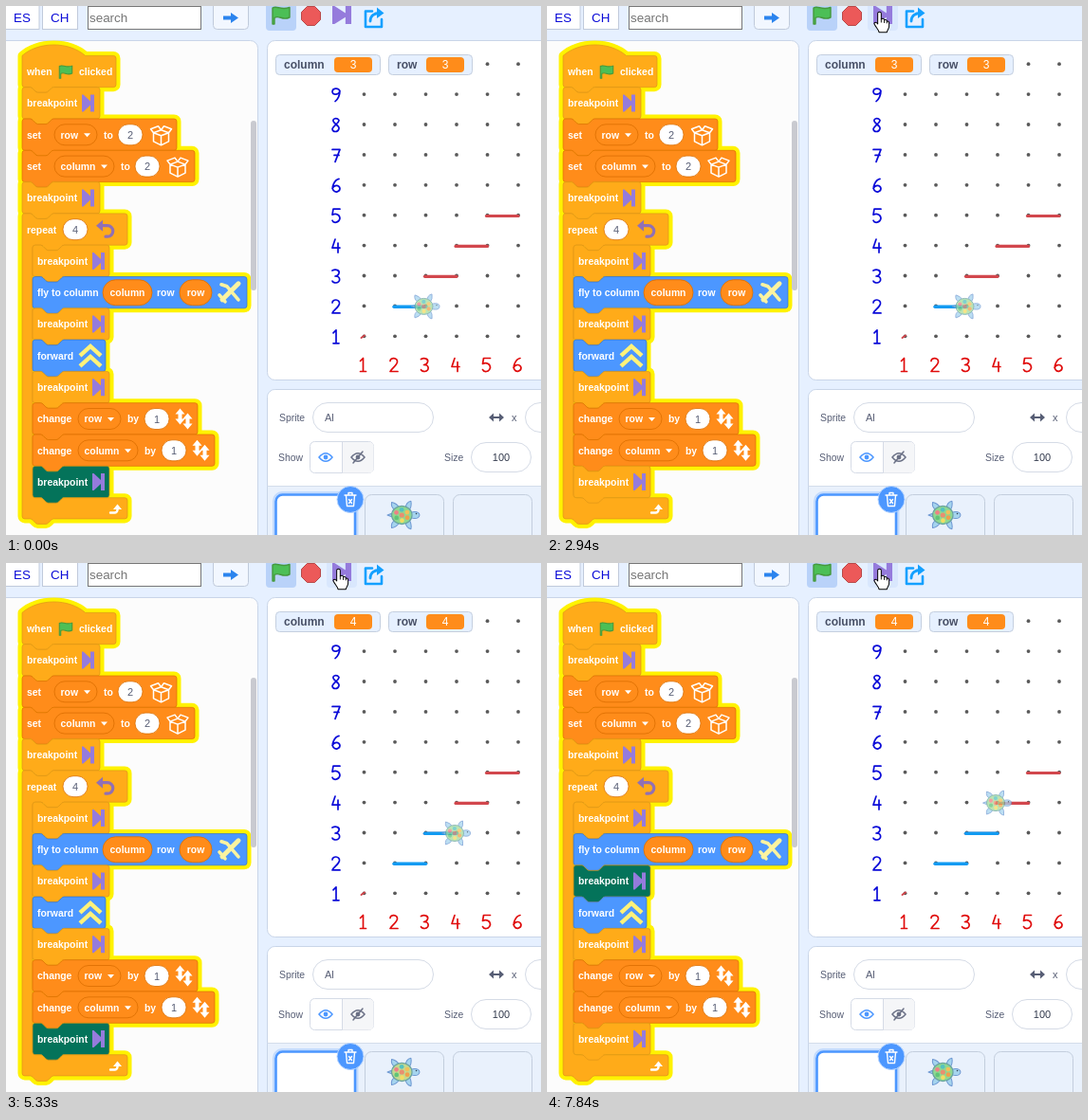
Animation, 564 px wide and 558 px high, one loop 8000 ms. Source, as an HTML page:

```html
<!DOCTYPE html>
<html lang="en">
<head>
<meta charset="utf-8">
<title>Stepping through a loop</title>
<style>
html, body { margin: 0; width: 100%; height: 100%; overflow: hidden; background: #e6f0ff; }
svg { display: block; width: 564px; height: 558px; font-family: "Liberation Sans", Arial, sans-serif; }
.b { font-weight: bold; font-size: 10.4px; fill: #fff; }
.m { text-anchor: middle; }
.num { font-size: 11px; fill: #575e75; text-anchor: middle; }
.ui { font-size: 11px; fill: #575e75; }
.small { font-size: 10.4px; fill: #575e75; }
.bar { font-size: 13.4px; }
.mon { font-size: 12px; font-weight: bold; fill: #485066; }
</style>
</head>
<body>
<svg id="view" viewBox="0 0 564 558"></svg>
<script>
const LOOP = 8000, S = 0.694, ROW = 33.3, TOP = 52.4;
const $ = id => document.getElementById(id);

const COLORS = {
  control: ['#ffab19', '#dd9418'],
  data: ['#ff8c1a', '#db6e00'],
  motion: ['#4c97ff', '#3373cc']
};
const ACTIVE_FILL = '#04735a';
const PURPLE = '#957bdc';

// ---- basic pieces ----
const rect = (x, y, w, h, fill, stroke = 'none', r = 0, sw = 1) =>
  `<rect x="${x}" y="${y}" width="${w}" height="${h}" rx="${r}" fill="${fill}" stroke="${stroke}" stroke-width="${sw}"/>`;
const text = (x, y, str, cls, extra = '') => `<text x="${x}" y="${y}" class="${cls}" ${extra}>${str}</text>`;
const line = (d, color, w, extra = '') =>
  `<path d="${d}" fill="none" stroke="${color}" stroke-width="${w}" stroke-linecap="round" stroke-linejoin="round" ${extra}/>`;
const fill = (d, color, extra = '') => `<path d="${d}" fill="${color}" ${extra}/>`;
const place = (x, y, inner, k = 1) => `<g transform="translate(${x} ${y}) scale(${k})">${inner}</g>`;

const skip = fill('M0 0H1.5L9 7V0h4v18h-4v-7L1.5 18H0z', PURPLE);
const flag = k => fill('M1 2C6-1 9 5 19 1.5V12C11 16 8 9 3 12.5V19H1z', '#4cbf56',
  `stroke="#45993d" stroke-width="1.4" stroke-linejoin="round" transform="scale(${k})"`);
const box = line('M-8-2L0 1L8-2V7L0 11L-8 7ZM0 1V11M-8-2L-11-6L-3-9L0-5L3-9L11-6L8-2M-8-2L0-5L8-2', '#fff', 1.5);
const twoWay = 'l5 6h-3v5h3l-5 6l-5-6h3v-5h-3z';
const upDown = fill(`M-4-11${twoWay}M4-6${twoWay}`, '#fff');

// ---- block outlines, in block units ----
const notch = 'c2 0 3 1 4 2l4 4c1 1 2 2 4 2h12c2 0 3-1 4-2l4-4c1-1 2-2 4-2';
const bump = 'c-2 0-3 1-4 2l-4 4c-1 1-2 2-4 2h-12c-2 0-3-1-4-2l-4-4c-1-1-2-2-4-2';
const topEdge = `M0 4A4 4 0 0 1 4 0H12${notch}`;
const right = (w, y0, y1) => `H${w - 4}a4 4 0 0 1 4 4V${y1 - 4}a4 4 0 0 1-4 4`;
const foot = h => `H48${bump}H4A4 4 0 0 1 0 ${h - 4}Z`;
const plain = w => topEdge + right(w, 0, 48) + foot(48);
const hat = w => `M0 0C25-22 71-22 96 0${right(w, 0, 48)}${foot(48)}`;
const cShape = (w, n) => {
  const low = 48 + 48 * n;
  return topEdge + right(w, 0, 48) + `H64${bump}h-8a4 4 0 0 0-4 4V${low - 4}a4 4 0 0 0 4 4`
    + right(w, low, low + 32) + foot(low + 32);
};

// row, left, right edge, colour, outline
const BLOCKS = [
  [0, 17, 116, 'control', hat],
  [1, 17, 99, 'control'], [2, 17, 180, 'data'], [3, 17, 199, 'data'], [4, 17, 99, 'control'],
  [5, 17, 128, 'control', w => cShape(w, 8)],
  [6, 28, 109, 'control'], [7, 28, 254, 'motion'], [8, 28, 109, 'control'], [9, 28, 105, 'motion'],
  [10, 28, 109, 'control'], [11, 28, 202, 'data'], [12, 28, 220, 'data'], [13, 28, 109, 'control']
];
const mid = r => 69.2 + ROW * r;

function blockPaths(glow) {
  return BLOCKS.map(([r, x, x2, kind, shape = plain]) => {
    const [f, s] = COLORS[kind];
    const paint = glow ? 'fill="none" stroke="#fff200" stroke-width="13" stroke-linejoin="round"'
      : `id="block${r}" fill="${f}" stroke="${s}" stroke-width="1"`;
    return `<path transform="translate(${x} ${TOP + ROW * r}) scale(${S})" d="${shape((x2 - x) / S)}" ${paint}/>`;
  }).join('');
}

const label = (r, x, str) => text(x, mid(r) + 3.8, str, 'b');
const pill = (r, x, w, f, s, h = 22) => rect(x, mid(r) - h / 2, w, h, f, s, h / 2, .8);
const value = (r, cx, n) => pill(r, cx - 13, 26, '#fff', '#db6e00') + text(cx, mid(r) + 4, n, 'num');
const menu = (r, x, w, name) => pill(r, x, w, ...COLORS.data) + label(r, x + 6.5, name)
  + fill(`M${x + w - 14} ${mid(r) - 1.5}h7l-3.5 4z`, '#fff');
const reporter = (r, x, w, name) => pill(r, x, w, ...COLORS.data, 27)
  + text(x + w / 2, mid(r) + 3.8, name, 'b m');

function blockContents() {
  let s = label(0, 22, 'when') + place(55.5, 62, flag(.75)) + label(0, 77, 'clicked');
  for (const r of [1, 4, 6, 8, 10, 13]) {
    const x = r < 5 ? 22 : 33;
    s += label(r, x, 'breakpoint') + place(x + 58, mid(r) - 9, skip);
  }
  s += label(2, 22, 'set') + menu(2, 51, 45, 'row') + label(2, 103, 'to') + value(2, 131, 2) + place(163.5, mid(2), box);
  s += label(3, 22, 'set') + menu(3, 51, 63, 'column') + label(3, 121, 'to') + value(3, 149, 2) + place(181, mid(3), box);
  s += label(5, 22, 'repeat') + value(5, 73, 4)
    + place(105, mid(5), line('M-4-4H2A5.5 5.5 0 0 1 2 7.5H0', '#9170b4', 3.2) + fill('M-10-4L-3-10V2z', '#9170b4'));
  s += label(7, 33, 'fly to column') + reporter(7, 102, 52, 'column') + label(7, 159, 'row') + reporter(7, 183, 34, 'row')
    + place(236, mid(7) - .5, line('M-8 8L9-9', '#fbf3a0', 5) + line('M-9-8L-3-6L9 8M-11 3L-5 10', '#fbf3a0', 3.6));
  s += label(9, 33, 'forward') + place(89, mid(9), line('M-11 0L0-10L11 0M-11 11L0 1L11 11', '#fff27a', 4.4, 'style="stroke-linecap:butt;stroke-linejoin:miter"'));
  s += label(11, 33, 'change') + menu(11, 76, 45, 'row') + label(11, 128, 'by') + value(11, 159, 1) + place(187.5, mid(11), upDown);
  s += label(12, 33, 'change') + menu(12, 76, 63, 'column') + label(12, 146, 'by') + value(12, 177, 1) + place(205.5, mid(12), upDown);
  return s + line('M110 534.5h4.5a3 3 0 0 0 3-3v-1', '#fff', 2.4) + fill('M113 531L117.5 525.5L122 531z', '#fff');
}

// ---- toolbar ----
function toolbar() {
  return rect(-6, -6, 41, 30.5, '#fff', '#c0cadb') + text(8, 17, 'ES', 'bar', 'fill="#0b0bd8"')
    + rect(38.5, -6, 37, 30.5, '#fff', '#c0cadb') + text(47, 17, 'CH', 'bar', 'fill="#0b0bd8"')
    + rect(86.5, .5, 119, 24, '#fff', '#767676') + text(88, 17, 'search', 'bar', 'fill="#757575"')
    + rect(218.5, -4, 37, 28.5, '#f2f7ff', '#c0cadb', 4)
    + fill('M229 10.5h8V7l8 5.5l-8 5.5v-3.5h-8z', '#2b84ee')
    + rect(274, -6, 32, 32, '#b9d2f9', 'none', 4)
    + place(280, 0, flag(1))
    + fill('M317.5 .5h8l6 6v8l-6 6h-8l-6-6v-8z', '#ec5959', 'stroke="#b84848"')
    + `<g id="hover">${rect(338, -6, 32, 32, '#d9e7fd', 'none', 4)}</g>`
    + `<g transform="translate(344 0) scale(1.54 1.06)">${skip}</g>`
    + line('M386 5.5H379V22H396V14', '#14a0ff', 2.6)
    + line('M384 16C384 10 388 7.5 394 7.5', '#14a0ff', 2.8) + fill('M391 1.5L398.5 7.5L391 13z', '#14a0ff');
}

// ---- stage ----
const DIGITS = [
  'M-3-4L0-7V7M-3 7H3',
  'M-4-4C-4-8 4-8 3.5-3C3 1-3 4-4 7H4',
  'M-4-6C0-8 4-6 3-3C2 0 0 0-1 0C5 0 5 6 0 7C-2 7-4 6-4 5',
  'M-1-7L-4 2H4M2-3V7',
  'M4-7H-3L-4-1C0-3 4-1 4 3C3 8-3 8-4 5',
  'M3-7C-2-6-5 2-3 5C-1 8 4 7 4 3C3-1-2-1-4 3',
  'M-4-6H4L-1 7M-2 0H3',
  'M3-5C1-8-4-7-3-4C-2-1 4 1 3 4C2 8-4 8-4 4C-3 1 3-2 3-5',
  'M4-4C2-8-4-7-4-3C-3 1 3 0 4-4C4 0 2 5-1 7'
];
const gx = c => 377.5 + (c - 1) * 32.5;
const gy = r => 348.3 - (r - 1) * 31.9;
const segment = (c, r, len = 1) => `M${gx(c) - 1} ${gy(r) + .8}H${gx(c + len) - 1 + len}`;

const turtle = (shellId = '') => {
  const limb = 'fill="#a5d4ee" stroke="#6d97d2" stroke-width=".9" stroke-linejoin="round"';
  const flippers = k => `M2 ${6 * k}Q2 ${12 * k} 7 ${13 * k}Q8 ${8 * k} 5 ${4 * k}ZM-8 ${5 * k}Q-12 ${7 * k}-11 ${12 * k}Q-6 ${11 * k}-4 ${7 * k}Z`;
  let s = `<path ${limb} d="${flippers(1)}${flippers(-1)}M-11-1.5L-15 0L-11 1.5Z"/>`
    + `<ellipse cx="10.5" cy="0" rx="4.5" ry="3.2" ${limb}/>`
    + `<ellipse ${shellId} cx="-1.5" cy="0" rx="9.5" ry="8.5" fill="#a5dc9b" stroke="#6aa3a0"/>`;
  const spots = ['#f0a04c', '#f4dc62', '#60c478', '#ee8086', '#55c2c0', '#f2c05a'];
  spots.forEach((c, i) => {
    const a = i * Math.PI / 3 + .5;
    s += `<circle cx="${-1.5 + 5.8 * Math.cos(a)}" cy="${5 * Math.sin(a)}" r="2.1" fill="${c}"/>`;
  });
  return s + '<circle cx="-1.5" cy="0" r="2.3" fill="#e98f70"/><circle cx="12" cy="-1.3" r=".7" fill="#345"/>';
};

function stage() {
  let s = rect(275.5, 36.5, 300, 358, '#fff', '#c9d5e8', 8);
  for (let r = 1; r <= 10; r++)
    for (let c = r > 9 ? 5 : 1; c <= 6; c++) s += `<circle cx="${gx(c)}" cy="${gy(r)}" r="1.9" fill="#5a5a5a"/>`;
  DIGITS.forEach((d, i) => {
    s += place(348, gy(i + 1) + .5, line(d, '#0a0ad8', 1.7));
    if (i < 6) s += place(gx(i + 1) - 1, 378.5, line(d, '#e00c0c', 1.7));
  });
  const red = '#d2474d', blue = '#129bf2';
  s += line('M374.5 350L378 347.5', red, 2);
  for (let c = 3; c <= 5; c++) s += line(segment(c, c), red, 3.2);
  s += line(segment(2, 2), blue, 3.4) + line('', blue, 3.4, 'id="trail"');
  const monitor = (x, w, name, id) => rect(x + .5, 51.5, w, 21, '#e6f0ff', '#c4cfdf', 4)
    + text(x + 9, 66, name, 'mon') + rect(x + w - 48, 54, 40, 16, '#ff8c1a', 'none', 4)
    + text(x + w - 28, 66.2, 3, 'm', `id="${id}" fill="#fff" font-size="12"`);
  return s + monitor(284, 110, 'column', 'colVal') + monitor(403, 88, 'row', 'rowVal')
    + `<g id="walker" opacity=".75">${turtle()}</g>`;
}

// ---- sprite panel ----
function sprites() {
  const grey = '#d5dbe6', card = ['#e9f1fc', '#c3cedd', 7];
  const eye = c => fill('M-7 0Q0-8.5 7 0Q0 8.5-7 0Z', 'none', `stroke="${c}" stroke-width="1.5"`) + `<circle r="2.4" fill="${c}"/>`;
  return rect(275.5, 404.5, 300, 170, '#e9f1fc', '#c9d5e8', 8)
    + fill('M276 506V413a8 8 0 0 1 8-8H564V506z', '#fff') + line('M276 506.5H564', '#d3ddeb', 1)
    + text(288, 438, 'Sprite', 'small') + rect(323.5, 418.5, 127, 31, '#fff', grey, 15.5) + text(336, 438, 'Al', 'ui')
    + line('M512 434H522', '#575e75', 2) + fill('M514 429.5L509 434L514 438.5zM520 429.5L525 434L520 438.5z', '#575e75')
    + text(533, 438, 'x', 'ui') + rect(547.5, 418.5, 60, 31, '#fff', grey, 15.5)
    + text(287, 480, 'Show', 'small')
    + rect(320.5, 459.5, 67, 33, '#fff', grey, 5) + fill('M354.5 460H383a4.5 4.5 0 0 1 4.5 4.5V488a4.5 4.5 0 0 1-4.5 4.5H354.5z', '#f5f6f8') + line('M354.5 460V492', grey, 1)
    + place(337, 476, eye('#4c97ff')) + place(371, 476, eye('#6b7186') + line('M-5 6L5-6', '#6b7186', 1.5))
    + text(462, 480, 'Size', 'small') + rect(490.5, 460.5, 63, 31, '#fff', grey, 15.5) + text(522, 480, '100', 'm', 'fill="#333a4d" font-size="11"')
    + rect(281, 512, 90.5, 74, '#c3dbfd', 'none', 10) + rect(284.5, 515.5, 83.5, 70, '#fff', '#4c97ff', 7, 2.6)
    + rect(378.5, 515.5, 83, 70, ...card) + rect(471.5, 515.5, 83, 70, ...card)
    + '<circle cx="363" cy="520.5" r="14" fill="#4c97ff" stroke="#b7d5ff"/>'
    + line('M357 516H369M361 516V513.5H365V516M358.5 516.5L359.5 527.5H366.5L367.5 516.5M361.5 520.5L364.5 524.5M364.5 520.5L361.5 524.5', '#fff', 1.4)
    + place(419, 537, turtle('id="thumbShell"'), 1.13);
}

// ---- pointer ----
const arrow = fill('M0 0V16L4 12.5L7 19L9.5 18L7 11.5H12Z', '#fff', 'stroke="#000"');
const hand = place(.5, 0, fill('M-2 1.5C-2-1 2-1 2 1.5V8C3 7 5.5 7.2 5.5 9C7 8 8.5 9 8.5 10.5C10 10 11 11 11 12.5V16C11 19 9 20 8.5 23H-.5C-1 20-3.5 18-5.5 14.5C-7 12-4.5 10.5-2 13.5Z',
  '#fff', 'stroke="#000" stroke-width="1.1" stroke-linejoin="round"') + line('M2 8V11.5M5.5 9.5V12M8.5 11V12.5', '#000', 1), .92);

$('view').innerHTML = rect(0, 0, 564, 558, '#e6f0ff')
  + rect(-10.5, 36.5, 276, 540, '#fcfcfc', '#c9d5e8', 8)
  + toolbar() + blockPaths(true) + blockPaths(false) + blockContents()
  + rect(258, 121, 6, 179, '#c9cad0', 'none', 3)
  + stage() + sprites()
  + '<circle id="press" cx="349" cy="6" r="12" fill="#ffe040" opacity=".5"/>'
  + `<g id="pointer"><g id="arrow">${arrow}</g><g id="hand">${hand}</g></g>`
  + `<g id="tip">${rect(359.5, 21.5, 57, 24, '#fff', '#767676')}${text(367, 38, 'Resume', '', 'fill="#444" font-size="11.3"')}</g>`;

// ---- timeline ----
const ACTIVE = [[0, 13], [1850, 6], [2940, -1], [3100, 8], [3785, -1], [4170, 10], [5330, 13], [6730, 6], [7670, -1], [7840, 8]];
const PRESSES = [[1700, 1850], [2710, 2860], [3560, 3710], [5100, 5330], [6510, 6660], [7440, 7590]];
const SPOTS = [[0, [3, 2]], [3020, [3, 3]], [7840, [4, 4]]];
const BREAKS = [6, 8, 10, 13];

const at = (table, t) => table.filter(e => e[0] <= t).pop()[1];
const show = (id, on) => $(id).setAttribute('display', on ? 'inline' : 'none');
const clamp = (v, a, b) => Math.min(b, Math.max(a, v));

function draw(t) {
  const active = at(ACTIVE, t);
  for (const r of BREAKS)
    $('block' + r).setAttribute('fill', r === active ? ACTIVE_FILL : COLORS.control[0]);

  $('colVal').textContent = $('rowVal').textContent = t < 5330 ? 3 : 4;

  const walked = clamp(Math.floor((t - 3785) / 77), 0, 4) / 4;
  let [c, r] = at(SPOTS, t);
  if (r === 3) c += walked;
  $('walker').setAttribute('transform', `translate(${gx(c) - .5} ${gy(r) + .5})`);
  $('trail').setAttribute('d', walked ? segment(3, 3, walked) : '');
  $('thumbShell').setAttribute('fill', t >= 4170 && t < 7840 ? '#c3d98f' : '#8fd890');

  // the pointer glides up to the button in eight even steps
  const step = clamp(Math.floor((t - 140) / 78.75), 0, 8);
  const p = step / 8, e = p * p * (3 - 2 * p), q = 1 - e;
  const x = q * q * 440 + 2 * q * e * 385 + e * e * 350;
  const y = q * q * 409.5 + 2 * q * e * 210 + e * e * 6.5;
  $('pointer').setAttribute('transform', `translate(${x} ${y})`);
  show('pointer', t >= 140);
  show('arrow', step < 8);
  show('hand', step === 8);
  show('hover', step === 8);
  show('tip', t >= 1240 && t < 1700);
  show('press', PRESSES.some(([a, b]) => t >= a && t < b));
}

const start = performance.now();
function tick() {
  draw((performance.now() - start) % LOOP);
  requestAnimationFrame(tick);
}
tick();
</script>
</body>
</html>
```
